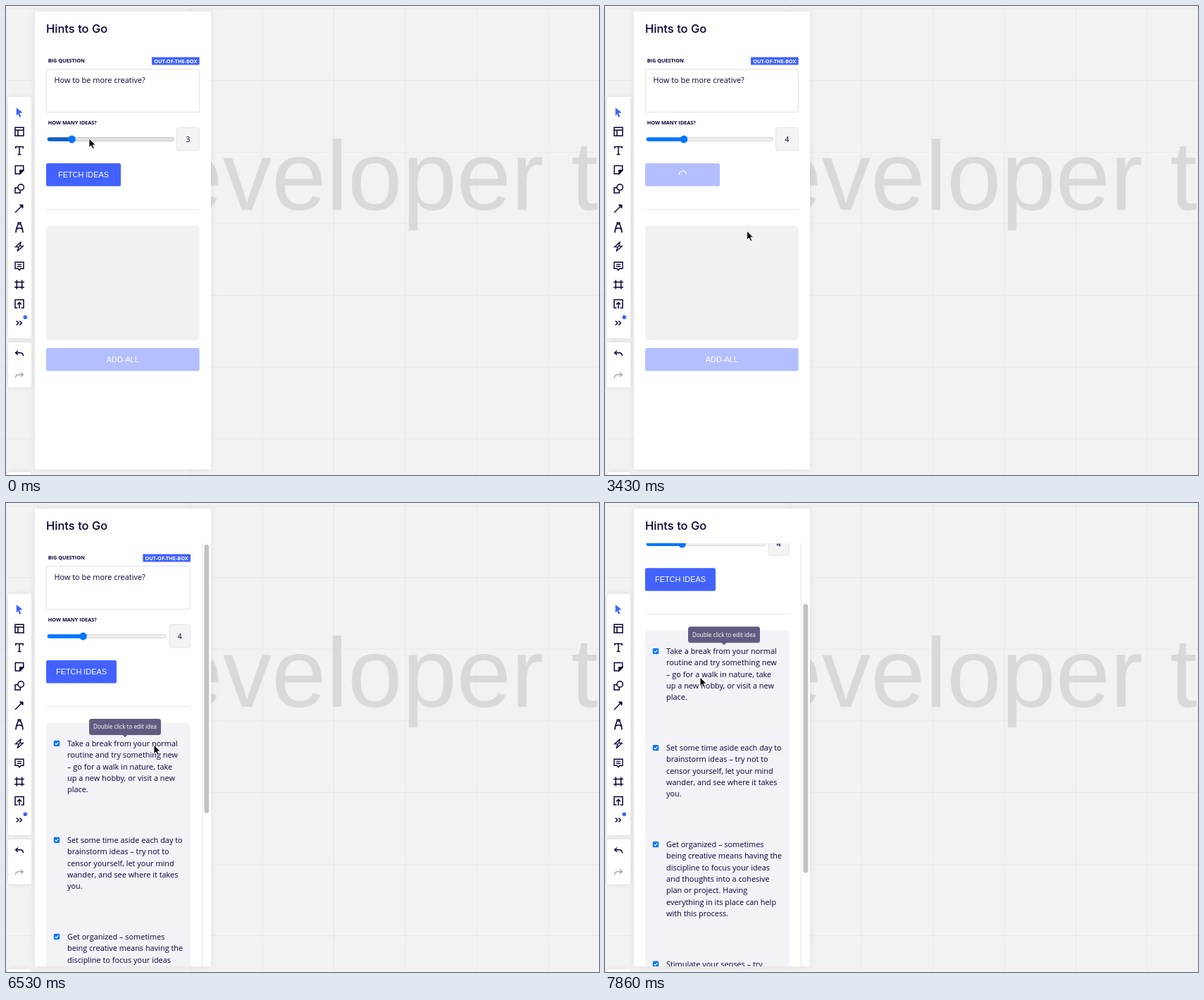
Write an HTML page that moves like this. It is 842 by 665 pixels and loops after 8 s.

```html
<!DOCTYPE html>
<html lang="en">
<head>
<meta charset="utf-8">
<title>Idea board</title>
<style>
  html, body { margin: 0; width: 100%; height: 100%; overflow: hidden; background: #f2f2f2; }
  svg { display: block; width: 842px; height: 665px; }
  text { fill: #050038; font-family: "Open Sans", sans-serif; font-size: 10.93px; }
  .title { font: 500 16.5px Inter, sans-serif; }
  .label { font-size: 7.3px; font-weight: 700; }
  .button { font: 10.9px "Liberation Sans", Arial, sans-serif; }
  .board { font: 139px "Liberation Sans", Arial, sans-serif; fill: #d9d9d9; }
  .tip { font-size: 8.1px; }
  .mid { text-anchor: middle; }
  .light { fill: #fff; }
  .icons { fill: none; stroke: #050038; stroke-width: 1.5; }
  .icons .solid { fill: #050038; }
  .shadow { filter: drop-shadow(0 0 4px rgba(5, 0, 56, .08)); }
</style>
</head>
<body>
<svg viewBox="0 0 842 665" xmlns="http://www.w3.org/2000/svg">
  <defs>
    <clipPath id="view"><rect x="41" y="57" width="250" height="600"/></clipPath>
  </defs>
  <rect width="842" height="665" fill="#f2f2f2"/>
  <g id="grid" stroke="#e8e8e8"></g>
  <text class="board" x="130" y="288.5">Developer team</text>

  <g class="shadow" fill="#fff">
    <rect x="3" y="129" width="33" height="342" rx="3"/>
    <rect x="3" y="477" width="33" height="63.5" rx="3"/>
    <rect x="3" y="661" width="33" height="10" rx="3"/>
    <rect x="41" y="8" width="250" height="649" rx="2"/>
  </g>

  <g class="icons">
    <path d="M14.8 144.3l8.7 6.6-4.4 1 2.4 4.8-2.2 1-2.3-4.8-2.2 2.8z" fill="#4262ff" stroke="none"/>
    <path d="M13 172.3h12v11.6H13zM13 176h12M17 176v8"/>
    <path d="M13.8 202v-2.6h10.4v2.6M19 199.4v11.4M16.6 210.6h4.8"/>
    <path d="M13.3 226.5h11.4v6.6l-4.8 4.8h-6.6z"/>
    <path class="solid" d="M24.5 233h-4.6v4.6z"/>
    <circle cx="21.2" cy="257" r="4.2"/>
    <path d="M17 257.8h-4v7.2h7.2v-3.8"/>
    <path d="M13 293l9-9"/>
    <path class="solid" d="M19.4 282h4.6v4.6z" stroke-width="1"/>
    <path d="M14 321.5c0-5 1.3-8.3 3.2-12.3h3.6c1.9 4 3.2 7.3 3.2 12.3M15 316.5c2-2.5 6-2.5 8 0M17.2 309.2v-2h3.6v2"/>
    <path d="M21.5 334.5l-8 7.2h4.8l-2.3 6 8.3-7.4h-4.9z" stroke-width="1.3"/>
    <path d="M13 363.3h12v9h-4l-2 2.4-2-2.4h-4zM16 366.4h6M16 369.2h6" stroke-width="1.4"/>
    <path d="M15.3 388.5v13M22.7 388.5v13M12 391.5h14M12 398.8h14"/>
    <path d="M16.5 428H13v-11.6h12V428h-3.5M19 429v-8.5M16 423.2l3-3 3 3"/>
    <path d="M14.8 446.5l3 3-3 3M19.3 446.5l3 3-3 3"/>
    <circle cx="27.3" cy="441.3" r="2.8" fill="#4262ff" stroke="none"/>
    <path d="M17 488.8l-3.4 3 3.4 3M13.8 491.8h6.4c3 0 4.2 1.8 4.2 4.5"/>
    <path d="M21 519.8l3.4 3-3.4 3M24.2 522.8h-6.4c-3 0-4.2 1.8-4.2 4.5" stroke="#a6a5b8"/>
  </g>

  <text class="title" x="57" y="38.3">Hints to Go</text>
  <g id="live"></g>
  <path id="pointer" d="M0 0v12.6l2.9-2.7 2.2 4.6 2.2-1-2.2-4.5h4z"
        stroke="#fff" stroke-width=".9" stroke-linejoin="round"/>
</svg>

<script>
const LOOP = 8000, TICK = 148.3;
const BLUE = '#4262ff', PALE = '#b3bfff';
const HOVER = 9, LOAD = 12, READY = 39;
const live = document.getElementById('live');
const pointer = document.getElementById('pointer');

// [tick, x, y]
const path = [
  [0, 118, 188], [1, 114, 188], [2, 109, 188], [3, 104.5, 188], [8, 104.5, 192],
  [9, 105, 212], [10, 107, 234], [11, 107, 234], [12, 125, 250], [14, 195, 293],
  [15, 202, 308], [18, 201, 319], [27, 202, 319], [32, 221, 321], [35, 222, 324],
  [38, 220, 328], [41, 211, 341], [44, 210, 343], [46, 192, 343], [50, 184, 345],
  [51, 110, 342], [52, 78, 285], [53, 135, 247]
];
// [tick, offset]
const scroll = [[0, 0], [44, 0], [45, 62], [46, 136.5], [47, 225], [48, 255], [49, 190], [50, 130.8]];

const ideas = [
  [341, ['Take a break from your normal', 'routine and try something new', '– go for a walk in nature, take',
    'up a new hobby, or visit a new', 'place.']],
  [478, ['Set some time aside each day to', 'brainstorm ideas – try not to', 'censor yourself, let your mind',
    'wander, and see where it takes', 'you.']],
  [615, ['Get organized – sometimes', 'being creative means having the', 'discipline to focus your ideas',
    'and thoughts into a cohesive', 'plan or project. Having', 'everything in its place can help', 'with this process.']],
  [784.7, ['Stimulate your senses – try', 'listening to music, looking at', 'art, or cooking a new dish to',
    'wake up fresh thoughts and', 'ideas.']]
];

function along(keys, k, i = 1) {
  const n = keys.findIndex(p => p[0] > k);
  if (n < 0) return keys[keys.length - 1][i];
  const a = keys[n - 1], b = keys[n];
  return a[i] + (b[i] - a[i]) * (k - a[0]) / (b[0] - a[0]);
}

const box = (x, y, w, h, r, fill, more = '') =>
  `<rect x="${x}" y="${y}" width="${w}" height="${h}" rx="${r}" fill="${fill}" ${more}/>`;
const text = (x, y, s, cls = '') => `<text x="${x}" y="${y}" class="${cls}">${s}</text>`;

function slider(k, right) {
  const over = k < 3, down = k >= 3 && k < 8;
  const x = over ? 93.5 : k < READY ? 112 : 109.5;
  const fill = over ? '#0860c4' : down ? '#3a94fb' : '#0075ff';
  return box(59, 186.5, right - 59, 5, 2.5, over ? '#e2e2e2' : '#efefef', `stroke="${over ? '#b8b8b8' : '#cbcbcb'}" stroke-width=".7"`)
    + box(58.7, 186.2, x - 58.7, 5.6, 2.8, fill)
    + `<circle cx="${x}" cy="189" r="5.4" fill="${down ? '#005cc8' : '#0075ff'}"/>`;
}

function fetchButton(k, w) {
  const busy = k >= LOAD && k < READY;
  const fill = busy ? PALE : k >= HOVER && k < LOAD ? '#3653ea' : BLUE;
  const inner = busy
    ? `<path d="M0-5.3A5.3 5.3 0 0 1 0 5.3" transform="translate(110.3 239.2) rotate(${(k - 14) * 69.4})" fill="none" stroke="#fff" stroke-width="1.1"/>`
    : text(57 + w / 2, 243, 'FETCH IDEAS', 'button mid light');
  return box(57, 223, w, 32.5, 2.5, fill) + inner;
}

function idea([y, lines]) {
  return box(67.8, y - 4.3, 8.4, 8.4, 1.5, '#0075ff')
    + `<path d="M69.8 ${y}l1.6 1.7 2.9-3.6" fill="none" stroke="#fff" stroke-width="1.2"/>`
    + lines.map((s, i) => text(87, y + 4 + i * 16.3, s)).join('');
}

function tooltip(y) {
  return box(118, y - 35, 102, 23, 3.5, '#605c80')
    + `<path d="M165.5 ${y - 12.2}h7l-3.5 3.4z" fill="#605c80"/>`
    + text(169, y - 20.7, 'Double click to edit idea', 'tip mid light');
}

function panel(k, top, py) {
  const ready = k >= READY;
  const right = ready ? 262 : 274.7, w = right - 57;
  const num = ready ? 232 : 242.5;
  const end = ready ? 905 : 474;
  const body = text(59.7, 80.4, 'BIG QUESTION', 'label')
    + box(right - 67.7, 72.5, 67.7, 11, 1, BLUE)
    + text(right - 33.9, 80.6, 'OUT-OF-THE-BOX', 'label mid light')
    + box(57.3, 89.6, w - .6, 61, 1, '#fff', 'stroke="#e0e0e5"')
    + text(68.5, 109.3, 'How to be more creative?')
    + text(59.7, 167.8, 'HOW MANY IDEAS?', 'label')
    + slider(k, ready ? 228 : 238.5)
    + box(num, 172.5, right - num - .4, 32.5, 3, '#f4f4f6', 'stroke="#e4e4e9"')
    + text((num + right) / 2 - .3, 193, k < 3 ? 3 : 4, 'mid" font-weight="500')
    + fetchButton(k, ready ? 100 : 106)
    + box(57, 288, w, 1, 0, '#e6e6ea')
    + box(57, 311.3, w, end - 311.3, 5, ready ? '#f3f3f7' : '#f1f1f1')
    + (ready ? ideas.map(idea).join('') : '')
    + box(57, end + 11, w, 32.5, 2.5, ready ? BLUE : PALE)
    + text(57 + w / 2, end + 31, 'ADD-ALL', 'button mid light');

  let over = '';
  if (ready) {
    over = box(278, 57, 1, 600, 0, '#e8e8e8') + box(281.5, 59 + top * .645, 6.7, 381, 3.3, '#c1c1c1');
    const hit = ideas.filter(d => d[0] - 20 <= py + top).pop();
    if (hit) over += tooltip(hit[0] - top);
  }
  return `<g clip-path="url(#view)"><g transform="translate(0 ${-top})">${body}</g></g>` + over;
}

function drawGrid() {
  let s = '';
  for (let i = 0; i < 7; i++) {
    const y = 4 + i * 101.6, x = 262.5 + i * 101.5;
    s += `<path d="M0 ${y}H842M${x} 0V665"/>`;
  }
  document.getElementById('grid').innerHTML = s;
}

let shown = -1;
function render(now) {
  const k = Math.floor((now % LOOP) / TICK);
  if (k !== shown) {
    shown = k;
    const x = along(path, k), y = along(path, k, 2);
    live.innerHTML = panel(k, along(scroll, k), y);
    pointer.setAttribute('transform', `translate(${x} ${y})`);
  }
}

drawGrid();
const start = performance.now();
function loop() {
  render(performance.now() - start);
  requestAnimationFrame(loop);
}
loop();
</script>
</body>
</html>
```
